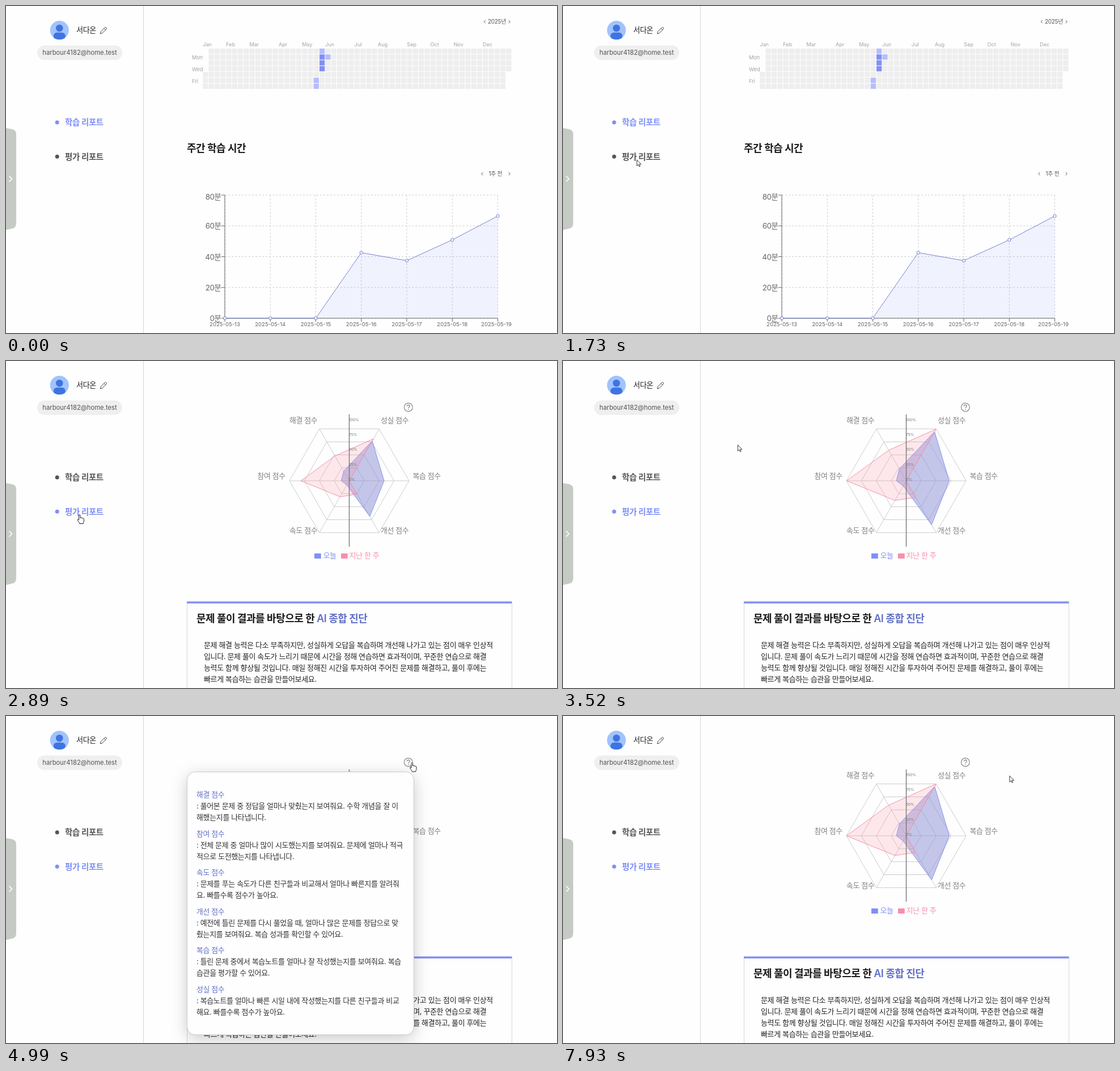
Recreate the animation shown at these times as an HTML page. Size 972 px wide and 576 px high, loop 8000 ms.

```html
<!DOCTYPE html>
<html lang="ko">
<head>
<meta charset="utf-8">
<title>학습 리포트</title>
<style>
  html, body { margin: 0; width: 100%; height: 100%; overflow: hidden; background: #fefefe; }
  svg { display: block; width: 100vw; height: 100vh; }
  text { font-family: Inter, "Noto Sans CJK KR", sans-serif; white-space: pre; }
  .ko { letter-spacing: -.03em; }
  #popup rect { filter: drop-shadow(0 7px 14px rgba(0, 0, 0, .2)); }
</style>
</head>
<body>
<svg id="stage" viewBox="0 0 972 576" xmlns="http://www.w3.org/2000/svg"></svg>
<script>
const LOOP = 8000;
const BLUE = '#7f8ff8', PINK = '#f78fab', INDIGO = '#6070c6', GRAY = '#808080', DARK = '#555';
const TAB_SWITCH = 1940, RADAR_START = 2130, RADAR_TIME = 1500;
const POPUP_OPEN = 4700, POPUP_CLOSE = 7720;

const text = (x, y, s, size, fill, { weight = 400, anchor = 'start', ko = true } = {}) =>
  `<text x="${x}" y="${y}" font-size="${size}" fill="${fill}" font-weight="${weight}" text-anchor="${anchor}"${ko ? ' class="ko"' : ''}>${s}</text>`;
const rect = (x, y, w, h, fill, extra = '') =>
  `<rect x="${x}" y="${y}" width="${w}" height="${h}" fill="${fill}" ${extra}/>`;
const circle = (x, y, r, fill, extra = '') => `<circle cx="${x}" cy="${y}" r="${r}" fill="${fill}" ${extra}/>`;
const path = (d, stroke, width = 1, extra = '') =>
  `<path d="${d}" fill="none" stroke="${stroke}" stroke-width="${width}" ${extra}/>`;
const chevron = (x, y, dir, size = 2.6, color = '#555', width = 1) =>
  path(`M${x - dir * size / 2} ${y - size}L${x + dir * size / 2} ${y}L${x - dir * size / 2} ${y + size}`, color, width);
const range = n => [...Array(n).keys()];

function sidebar() {
  return path('M242.5 0V576', '#d6d6d6')
    + '<path d="M0 215L11 217Q18 218.500 18 226V383Q18 390.500 11 392L0 394.500Z" fill="#c5cbc4"/>'
    + chevron(8, 304.5, 1, 5, '#fff', 1.6)
    + '<clipPath id="face"><circle cx="94.3" cy="42.700" r="16.600"/></clipPath>'
    + circle(94.3, 42.7, 16.6, '#a1c3fd')
    + `<g clip-path="url(#face)">${circle(94.3, 39, 6.3, '#3f74e0')}<rect x="83.800" y="46.700" width="21" height="12.300" rx="6" fill="#3f74e0"/></g>`
    + text(124, 47.3, '서다온', 13.1, '#222')
    + path('M166.300 49L167.300 45L174.600 37.800Q175.800 37 176.900 38.100Q178 39.300 177.200 40.400L170 47.700ZM173 39.500L175.600 42.100', '#444', 1)
    + rect(55, 69.5, 150, 25.5, '#efefef', 'rx="12.700"')
    + text(130, 86.4, 'harbour4182@home.test', 11.3, '#555', { anchor: 'middle', ko: false })
    + ['학습 리포트', '평가 리포트'].map((label, i) =>
        `<g id="tab${i}">${circle(90.2, 205 + i * 60.2, 3.5, 'inherit')}` +
        `<text class="ko" x="104" y="${210.3 + i * 60.2}" font-size="14.500" font-weight="600">${label}</text></g>`).join('');
}

function heatmap() {
  const pitch = 10.29, x0 = 347.2, y0 = 74.9;
  const months = 'Jan Feb Mar Apr May Jun Jul Aug Sep Oct Nov Dec'.split(' ');
  const monthCols = [0, 4, 8, 13, 17, 21, 26, 30, 35, 39, 43, 48];
  const light = '#b5bdfc', deep = '#8290f2';
  const solved = { '19,5': light, '19,6': light, '20,0': light, '20,1': deep, '20,2': deep, '20,3': deep, '21,1': light };
  let out = '';
  for (const c of range(53)) for (const r of range(7)) {
    if ((c === 0 && r < 4) || (c === 52 && r > 3)) continue;
    out += rect(x0 + c * pitch, y0 + r * pitch, 9.3, 9.3, solved[c + ',' + r] || '#eeeeee');
  }
  months.forEach((m, i) => out += text(x0 + monthCols[i] * pitch, 71, m, 9.1, '#a3a3a3', { ko: false }));
  ['Mon', 'Wed', 'Fri'].forEach((d, i) => out += text(328, 94.3 + i * 20.6, d, 9.2, '#a3a3a3', { ko: false }));
  return out + chevron(844.5, 27.7, -1) + text(850, 31.2, '2025년', 10, DARK) + chevron(888, 27.7, 1);
}

function weekChart() {
  const left = 386, top = 333, right = 867.5, bottom = 550;
  const step = (right - left) / 6, row = (bottom - top) / 4;
  const ys = [550, 550, 550, 434.5, 448.5, 412, 370];
  const pts = ys.map((y, i) => [left + i * step, y]);
  const line = 'M' + pts.map(p => p.join(' ')).join('L');
  let out = text(319, 257, '주간 학습 시간', 18, '#1a1a1a', { weight: 600 })
    + chevron(840, 295.5, -1) + text(851.5, 299, '1주 전', 9.9, DARK) + chevron(888, 295.5, 1);
  for (const i of range(5)) {
    const y = top + i * row;
    out += path(`M${left} ${y}H${right}`, '#ccc', 1, 'stroke-dasharray="3 3"')
      + path(`M${left - 6} ${y}H${left}`, '#666')
      + text(379.5, y + (i ? 5 : 8), 80 - i * 20 + '분', 13.4, '#666', { anchor: 'end' });
  }
  for (const i of range(7)) {
    const x = left + i * step;
    out += path(`M${x} ${top}V${bottom}`, '#ccc', 1, 'stroke-dasharray="3 3"')
      + path(`M${x} ${bottom}v6`, '#666')
      + text(i < 6 ? x : 865, 564, '2025-05-' + (13 + i), 9.6, '#666', { anchor: 'middle', ko: false });
  }
  out += path(`M${left} ${top}V${bottom}H${right}`, '#666')
    + `<path d="${line}V${bottom}H${left}Z" fill="${BLUE}" fill-opacity=".11"/>`
    + path(line, '#7682d0');
  return out + pts.map(p => circle(p[0], p[1], 2.7, '#f4f5fe', 'stroke="#7682d0"')).join('');
}

function tooltip() {
  return '<g id="tip">' + rect(750.7, 78, 88.5, 49.7, '#222', 'rx="2.500"')
    + '<path d="M790 127.500h10l-5 5z" fill="#222"/>'
    + '</g><g id="tipText">' + text(764, 98.3, '2025-11-01', 11.3, '#fff', { ko: false })
    + text(764, 116.5, '0개 풀이', 12.2, '#fff') + '</g>';
}

// Radar axes run clockwise from the right: vertex i sits at i * 60 degrees.
const RADAR = { x: 605.5, y: 211, r: 105.5 };
const TODAY = [.72, .85, .1, .165, .23, .95];
const WEEK = [0, .32, .38, 1, .59, 1];
const radarPath = values => 'M' + values.map((v, i) => {
  const a = i * Math.PI / 3;
  return `${(RADAR.x + RADAR.r * v * Math.cos(a)).toFixed(2)} ${(RADAR.y + RADAR.r * v * Math.sin(a)).toFixed(2)}`;
}).join('L') + 'Z';

function radar() {
  const { x, y, r } = RADAR;
  const grid = [.25, .5, .75, 1].map(v => radarPath(Array(6).fill(v))).join('')
    + range(3).map(i => {
      const dx = r * Math.cos(i * Math.PI / 3), dy = r * Math.sin(i * Math.PI / 3);
      return `M${x - dx} ${y - dy}L${x + dx} ${y + dy}`;
    }).join('');
  const labels = [['해결', 500, 109], ['성실', 661, 109], ['참여', 443.5, 206.5], ['복습', 717.5, 206.5], ['속도', 500, 303.3], ['개선', 661, 303.3]];
  return path(grid, '#ccc')
    + `<path id="today" fill="#8a8fd6" fill-opacity=".5" stroke="#8793f2"/>`
    + `<path id="week" fill="#f78da2" fill-opacity=".2" stroke="${PINK}"/>`
    + path(`M${x} 94V327`, '#777', 1.4)
    + range(5).map(i => text(605, 210.8 - i * 26.3, i * 25 + '%', 6.7, '#777', { ko: false })).join('')
    + labels.map(([s, lx, ly]) => text(lx, ly, s + ' 점수', 12.9, GRAY)).join('')
    + circle(709.8, 81.5, 7.4, 'none', 'stroke="#888" stroke-width="1.200"')
    + path('M707.300 79.800Q707.400 77.300 709.800 77.300Q712.300 77.400 712.300 79.500Q712.200 80.800 710.900 81.500Q709.800 82.200 709.800 83.300', '#888', 1.2)
    + circle(709.8, 85.4, .8, '#888')
    + rect(544, 339, 11.7, 9, BLUE) + text(559.5, 347.4, '오늘', 13, BLUE)
    + rect(591, 339, 11.7, 9, PINK) + text(605.5, 347.4, '지난 한 주', 13, PINK);
}

function diagnosis() {
  const lines = [
    '문제 해결 능력은 다소 부족하지만, 성실하게 오답을 복습하며 개선해 나가고 있는 점이 매우 인상적',
    '입니다. 문제 풀이 속도가 느리기 때문에 시간을 정해 연습하면 효과적이며, 꾸준한 연습으로 해결',
    '능력도 함께 향상될 것입니다. 매일 정해진 시간을 투자하여 주어진 문제를 해결하고, 풀이 후에는',
    '빠르게 복습하는 습관을 만들어보세요.'];
  return path('M319.500 426V576M892.500 426V576', '#d8d8d8') + rect(319, 423.5, 573.5, 3.6, '#8490f6')
    + text(336, 460, `문제 풀이 결과를 바탕으로 한 <tspan fill="${INDIGO}">AI 종합 진단</tspan>`, 18, '#1a1a1a', { weight: 600 })
    + lines.map((s, i) => text(349, 505 + i * 20.1, s, 13.04, '#222')).join('');
}

function popup() {
  const items = [
    ['해결', ': 풀어본 문제 중 정답을 얼마나 맞췄는지 보여줘요. 수학 개념을 잘 이', '해했는지를 나타냅니다.'],
    ['참여', ': 전체 문제 중 얼마나 많이 시도했는지를 보여줘요. 문제에 얼마나 적극', '적으로 도전했는지를 나타냅니다.'],
    ['속도', ': 문제를 푸는 속도가 다른 친구들과 비교해서 얼마나 빠른지를 알려줘', '요. 빠를수록 점수가 높아요.'],
    ['개선', ': 예전에 틀린 문제를 다시 풀었을 때, 얼마나 많은 문제를 정답으로 맞', '췄는지를 보여줘요. 복습 성과를 확인할 수 있어요.'],
    ['복습', ': 틀린 문제 중에서 복습노트를 얼마나 잘 작성했는지를 보여줘요. 복습', '습관을 평가할 수 있어요.'],
    ['성실', ': 복습노트를 얼마나 빠른 시일 내에 작성했는지를 다른 친구들과 비교', '해요. 빠를수록 점수가 높아요.']];
  return '<g id="popup">' + rect(319.5, 98.5, 400, 463, '#fefefe', 'rx="14" stroke="#c9c9c9"')
    + items.map(([name, a, b], i) => {
      const y = 143.3 + i * 68.45;
      return text(336, y, name + ' 점수', 12.9, INDIGO) + text(336, y + 20, a, 13.04, '#333') + text(336, y + 40.1, b, 13.04, '#333');
    }).join('') + '</g>';
}

// Both pointers have their hot spot at the origin.
const pointers = `<g id="cursor" fill="#fff" stroke="#222" stroke-linejoin="round">
  <path id="arrow" stroke-width=".9" d="M.400 .400V11.200L2.900 8.900L4.500 12.500L6.100 11.800L4.500 8.300H7.900Z"/>
  <path id="hand" stroke-width="1" d="M-1.400 9.500V1.400Q-1.300 .200 -.200 .200Q1 .200 1 1.400V6Q1.200 5 2.200 5.100Q3.300 5.200 3.300 6.400Q3.700 5.600 4.500 5.700Q5.500 5.900 5.500 7Q6 6.400 6.700 6.600Q7.500 6.900 7.500 8V11.500Q7.400 13.300 6.300 14.500V16H-.300V14.700Q-2 13 -3.600 10Q-4.300 8.700 -3.500 8.300Q-2.600 7.900 -1.400 9.500Z"/>
</g>`;

document.getElementById('stage').innerHTML = rect(0, 0, 972, 576, '#fefefe') + sidebar()
  + `<g id="study">${heatmap()}${weekChart()}${tooltip()}</g>`
  + `<g id="review">${radar()}${diagnosis()}${popup()}</g>` + pointers;

// Time, x, y of the pointer.
const TRACK = [
  [130, 962, 558], [300, 930, 470], [500, 880, 320], [650, 832, 200], [765, 796, 142], [830, 748, 152.5],
  [900, 686, 172], [1100, 500, 212], [1350, 285, 251], [1550, 162, 270], [1700, 130, 270.5],
  [3170, 130, 270.5], [3240, 156, 279], [3310, 164, 280], [3380, 204, 261], [3450, 256, 196], [3520, 307, 148],
  [3590, 376, 106], [3660, 452, 72], [3730, 530, 49], [3870, 650, 33], [4010, 715, 34], [4360, 737, 43],
  [4500, 736, 60], [4640, 722, 79], [4780, 716.5, 82], [7719, 716.5, 82],
  [7720, 734.5, 86], [7790, 752, 91], [7860, 771, 98], [7930, 787.5, 105]];
const TIP = [[690, 0], [760, .6], [835, .6], [970, 0]];

function sample(keys, t) {
  if (t <= keys[0][0]) return keys[0].slice(1);
  const i = keys.findIndex(k => k[0] > t);
  if (i < 0) return keys[keys.length - 1].slice(1);
  const a = keys[i - 1], b = keys[i], k = (t - a[0]) / (b[0] - a[0]);
  return a.slice(1).map((v, j) => v + (b[j + 1] - v) * k);
}

// cubic-bezier(.25, .1, .25, 1)
function ease(p) {
  if (p <= 0 || p >= 1) return p <= 0 ? 0 : 1;
  const bez = (s, a, b) => 3 * s * (1 - s) ** 2 * a + 3 * s * s * (1 - s) * b + s ** 3;
  let lo = 0, hi = 1;
  for (let i = 0; i < 24; i++) {
    const mid = (lo + hi) / 2;
    if (bez(mid, .25, .25) < p) lo = mid; else hi = mid;
  }
  return bez(lo, .1, 1);
}

const $ = id => document.getElementById(id);
const show = (id, on) => $(id).setAttribute('display', on ? 'inline' : 'none');

function render(t) {
  const review = t >= TAB_SWITCH;
  show('study', !review);
  show('review', review);
  $('tab0').setAttribute('fill', review ? DARK : BLUE);
  $('tab1').setAttribute('fill', review ? BLUE : DARK);

  const [tip] = sample(TIP, t);
  $('tip').setAttribute('opacity', tip);
  $('tipText').setAttribute('opacity', Math.min(1, tip * 1.6));

  const grow = ease((t - RADAR_START) / RADAR_TIME);
  show('today', grow > 0);
  show('week', grow > 0);
  $('today').setAttribute('d', radarPath(TODAY.map(v => v * grow)));
  $('week').setAttribute('d', radarPath(WEEK.map(v => v * grow)));
  show('popup', t >= POPUP_OPEN && t < POPUP_CLOSE);

  const [x, y] = sample(TRACK, t);
  const hand = (t >= 1800 && t < 3240) || (t >= 4640 && t < POPUP_CLOSE);
  show('cursor', t >= 130);
  show('hand', hand);
  show('arrow', !hand);
  $('cursor').setAttribute('transform', `translate(${x.toFixed(2)} ${y.toFixed(2)})`);
}

const start = performance.now();
function tick() {
  render((performance.now() - start) % LOOP);
  requestAnimationFrame(tick);
}
tick();
</script>
</body>
</html>
```
